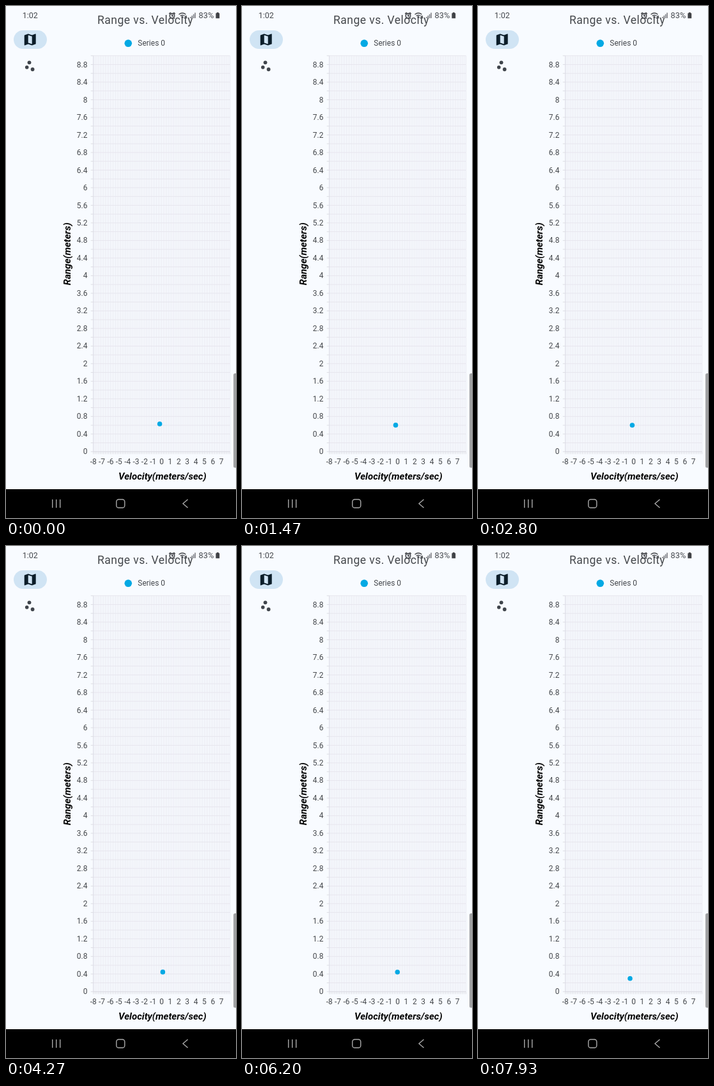
Recreate the animation shown at these times as an HTML page. Size 360 by 800 pixels, loop 8 s.

```html
<!DOCTYPE html>
<html lang="en">
<head>
<meta charset="utf-8">
<title>Range vs. Velocity</title>
<style>
html, body { margin: 0; width: 100%; height: 100%; overflow: hidden; background: #f8fbff; }
svg { display: block; width: 360px; height: 800px; font: 12px Roboto, sans-serif; fill: #45484c; }
.name { font: italic bold 15px Roboto, sans-serif; fill: #050505; text-anchor: middle; }
.line { fill: none; }
.point { fill: #04a9e4; }
</style>
</head>
<body>
<svg viewBox="0 0 360 800">
  <rect x="12" y="38" width="52" height="29" rx="14.5" fill="#d0e4f4"/>
  <path transform="translate(25.7 40.5)" fill="#0b1d29" d="M20.5 3l-.16.03L15 5.1 9 3 3.36 4.9c-.21.07-.36.25-.36.48V20.5c0 .28.22.5.5.5l.16-.03L9 18.9l6 2.1 5.64-1.9c.21-.07.36-.25.36-.48V3.5c0-.28-.22-.5-.5-.5zM15 19l-6-2.11V5l6 2.11V19z"/>
  <g fill="#40454c">
    <circle cx="36.5" cy="88.3" r="2.9"/>
    <circle cx="32.7" cy="95.8" r="2.8"/>
    <circle cx="41.6" cy="99" r="2.9"/>
  </g>

  <g id="grid" class="line"></g>
  <g id="labels"></g>

  <text x="143" y="28" font-size="17.6" letter-spacing=".43">Range vs. Velocity</text>
  <circle class="point" cx="191.3" cy="58.3" r="5.8"/>
  <text x="206.3" y="62.4">Series 0</text>
  <text class="name" x="244.8" y="740">Velocity(meters/sec)</text>
  <text class="name" transform="translate(101 387.3) rotate(-90)">Range(meters)</text>
  <circle id="dot" class="point" r="3.8"/>

  <text x="25.8" y="19" font-size="12.5">1:02</text>
  <text x="301.5" y="19" font-size="12.8">83%</text>
  <g stroke="#404246" stroke-width="1.6" class="line">
    <circle cx="260" cy="15.3" r="3.7"/>
    <path d="M260 13v2.6h2M255.3 12.3l2.5-2.1M264.7 12.3l-2.5-2.1M257.5 18.5l-1.2 1.5M262.5 18.5l1.2 1.5"/>
    <path stroke-width="1.3" d="M270.5 13.3q5.5-4.6 11 0M272.6 15.6q3.4-2.8 6.8 0"/>
  </g>
  <path fill="#404246" d="M274 17q2-1.5 4 0l-2 2.5zM280 15h1v4h-1zM282 15h1v4h-1zM329.8 10h3v1.2h1.4v8.1h-5.8v-8.1h1.4z"/>
  <path fill="#85878c" d="M288 17h1.7v2H288zM290.4 15h1.7v4h-1.7zM292.8 12.8h1.7V19h-1.7zM295.2 10.5h1.7V19h-1.7z"/>

  <rect x="356" y="574" width="8" height="147.5" rx="2.5" fill="#a1a2a4"/>
  <rect y="755" width="360" height="45" fill="#000"/>
  <g stroke="#a9a9a9" stroke-width="1.4" class="line">
    <path d="M72.7 771v13M78.7 771v13M84.7 771v13M284.5 771l-7.5 6.5 7.5 6.5"/>
    <rect x="172.8" y="771" width="13" height="13" rx="3.6"/>
  </g>
</svg>
<script>
const $ = id => document.getElementById(id);
const xAt = v => 243.6 + v * 13.36;
const yAt = r => 696.3 - r * 68.73;
const LEFT = xAt(-8), RIGHT = xAt(8), TOP = yAt(9), BASE = yAt(0);

function add(parent, tag, attrs, text = '') {
  const el = document.createElementNS('http://www.w3.org/2000/svg', tag);
  for (const key in attrs) el.setAttribute(key, attrs[key]);
  el.textContent = text;
  parent.append(el);
}

let columns = '', rows = '', ticks = '';
for (let i = 0; i <= 80; i++) {
  const x = xAt(i / 5 - 8);
  columns += `M${x} ${TOP}V${BASE}`;
  ticks += `M${x} ${BASE}v4`;
}
for (let i = 0; i <= 45; i++) {
  const y = yAt(i / 5);
  rows += `M${LEFT} ${y}H${RIGHT}`;
  ticks += `M${LEFT} ${y}h-4`;
  if (i % 2 === 0) add($('labels'), 'text', { x: 127.5, y: y + 4.1, 'text-anchor': 'end' }, +(i / 5).toFixed(1));
}
for (let v = -8; v < 8; v++) add($('labels'), 'text', { x: xAt(v), y: 716, 'text-anchor': 'middle' }, v);
add($('grid'), 'path', { d: columns, stroke: '#e8e8f0' });
add($('grid'), 'path', { d: rows, stroke: '#e7e6ee' });
add($('grid'), 'path', { d: ticks, stroke: '#d6d6dc', 'stroke-width': .8 });
add($('grid'), 'path', { d: `M${LEFT} ${TOP}V${BASE}H${RIGHT}`, stroke: '#dcdce4' });

// Each reading: time it arrives, then the point the dot eases to
const readings = [
  [-1000, 240.6, 653], [1235, 240.5, 655.2], [2095, 241.4, 655],
  [3635, 245.4, 665.7], [4495, 245.4, 648.3], [5365, 243.3, 665.7], [7635, 237.6, 676.6]
];
const LOOP = 8000, EASE_TIME = 800;
const expOut = p => p >= 1 ? 1 : 1 - (2 ** (-10 * p) - 2 ** -10) / (1 - 2 ** -10);

function draw(now) {
  const t = now % LOOP;
  let [, x, y] = readings[0];
  for (const [start, toX, toY] of readings) {
    if (t < start) break;
    const k = expOut((t - start) / EASE_TIME);
    x += (toX - x) * k;
    y += (toY - y) * k;
  }
  $('dot').setAttribute('cx', x);
  $('dot').setAttribute('cy', y);
  requestAnimationFrame(draw);
}
draw(0);
</script>
</body>
</html>
```
